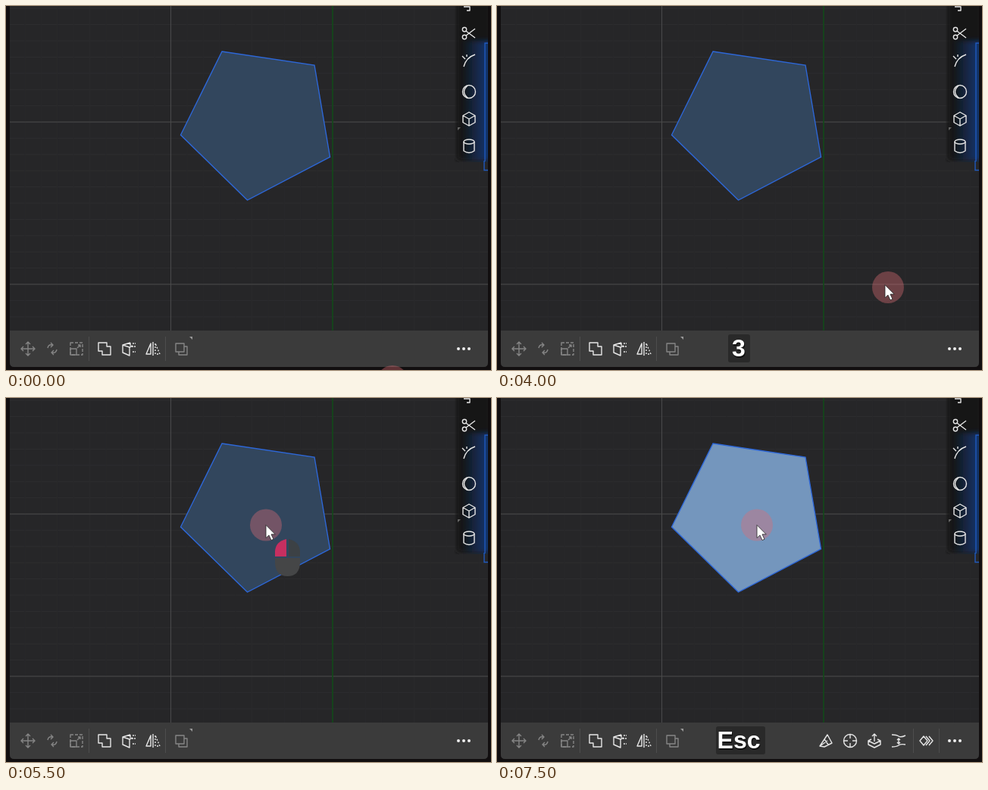
Animation, 640 px wide and 480 px high, one loop 8 s. Source, as an HTML page:

```html
<!DOCTYPE html>
<html lang="en">
<head>
<meta charset="utf-8">
<title>Extrude tool</title>
<style>
  html, body { margin: 0; width: 100%; height: 100%; overflow: hidden; background: #110e0f; }
  svg { display: block; width: 640px; height: 480px; }
  text { font-family: "Open Sans", "Noto Sans", sans-serif; font-size: 11.2px; fill: #c4c4c4; }
  .icon { fill: none; stroke: #e6e6e6; stroke-width: 1.4; stroke-linejoin: round; }
  .dim { stroke: #858585; }
  .bold { font-weight: 600; font-size: 11.7px; fill: #f2f2f2; }
  .soft { fill: #737373; }
  .white { fill: #f0f0f0; }
  .mid { text-anchor: middle; }
  .sep { stroke: #4d4d4d; }
  #hints text { font-size: 13px; fill: #a4a4a4; }
  #hints .end { text-anchor: end; }
  #hints .cap { font-size: 12px; font-weight: 600; text-anchor: middle; fill: #b5b5b5; }
  #key text { font: bold 32px "Liberation Sans", Arial, sans-serif; fill: #fff; text-anchor: middle; }
</style>
</head>
<body>
<svg id="scene" viewBox="0 0 640 480">
  <defs>
    <clipPath id="stage"><path d="M5 0H636V470Q636 476 630 476H11Q5 476 5 470Z"/></clipPath>
    <clipPath id="panelClip"><rect x="13" y="76" width="326" height="344" rx="4"/></clipPath>
    <clipPath id="sideClip"><rect x="592" width="44" height="206"/></clipPath>
    <linearGradient id="fade" gradientUnits="userSpaceOnUse" x1="235" x2="342" y1="0" y2="0">
      <stop stop-color="#4f7098" stop-opacity="0"/>
      <stop offset=".5" stop-color="#4f7098" stop-opacity=".25"/>
      <stop offset="1" stop-color="#5f82ab" stop-opacity=".6"/>
    </linearGradient>
    <linearGradient id="glow"><stop stop-color="#123b86" stop-opacity="0"/><stop offset="1" stop-color="#143f88"/></linearGradient>
    <filter id="blur" x="-30%" y="-30%" width="160%" height="160%"><feGaussianBlur stdDeviation="9"/></filter>
    <filter id="soften" x="-50%" y="-20%" width="200%" height="140%"><feGaussianBlur stdDeviation="3"/></filter>
  </defs>

  <rect width="640" height="480" fill="#110e0f"/>
  <g clip-path="url(#stage)">
    <rect width="640" height="480" fill="#262628"/>
    <g id="grid"></g>
    <path d="M217.500 0V428M5 153H636M5 367H636" stroke="#4a4a4b"/>
    <path d="M431 0V428" stroke="#124a19" stroke-width="1.6"/>
    <path id="shape" d="M285 60L407 78L427.500 199L318.500 256L230.500 170Z" stroke-width="1.4"/>
    <path id="through" d="M240 153H420" stroke="#7798a8"/>

    <g clip-path="url(#sideClip)">
      <rect x="594" y="-8" width="46" height="212" rx="5" fill="#151516" filter="url(#soften)"/>
      <rect x="602" y="46" width="44" height="158" fill="url(#glow)" filter="url(#soften)"/>
    </g>
    <path d="M637 49H632V205M631 204V216.500H637" fill="none" stroke="#2059bd" stroke-width="1.4"/>
    <path d="M596 160H600L596 164Z" fill="#666"/>
    <g class="icon">
      <path d="M604 1H612V6H608"/>
      <circle cx="605" cy="31" r="2.700"/><circle cx="605" cy="41" r="2.700"/><path d="M607 33L619 42M607 39L619 30"/>
      <path d="M604 80Q607 68 619 64M602 66L606 70M608 64V67"/>
      <circle cx="611" cy="113" r="8.500"/><path d="M609 105Q600 113 609 121"/>
      <path d="M611 140L619 144.500V153.500L611 158L603 153.500V144.500ZM603 144.500L611 149L619 144.500M611 149V158"/>
      <ellipse cx="611" cy="179" rx="7" ry="3"/><path d="M604 179V191Q611 196 618 191V179"/>
    </g>

    <rect x="5" y="428" width="631" height="48" fill="#3b3b3b"/>
    <path class="sep" d="M109.500 436V468M210.500 436V468"/>
    <g class="icon dim">
      <path d="M29 443V461M20 452H38M26 446L29 443L32 446M26 458L29 461L32 458M23 449L20 452L23 455M35 449L38 452L35 455"/>
      <path d="M55 451Q56 446 61 447M59 444L62 447L59 450M67 453Q66 458 61 457M63 454L60 457L63 460"/>
      <path d="M85 444H101V460H85Z" stroke-dasharray="4 2"/><path d="M85 452H93V460H85ZM94 451L98 447M95 447H98V450"/>
      <path d="M224 445H235V456H224ZM235 449H239V460H228V456"/>
    </g>
    <path d="M242 436H246V440Z" fill="#999"/>
    <g class="icon">
      <path d="M122 444H133V449H138V460H127V455H122Z"/>
      <path d="M164 444L154 447V457L163 461V450L154 447M163 450L167 448M164 444V448"/>
      <path d="M167 445H171M166 449H171M167 456H171" stroke-dasharray="2 1"/>
      <path d="M191 445V459H185ZM194 443V461"/><path d="M197 445V459H203Z" stroke-dasharray="2 2"/>
    </g>
    <g fill="#eee"><circle cx="597" cy="452" r="2"/><circle cx="604" cy="452" r="2"/><circle cx="611" cy="452" r="2"/></g>

    <g id="tools">
      <path class="sep" d="M549.500 436V468M583.500 436V468"/>
      <rect id="active" x="482" y="436" width="32" height="32" rx="4" fill="#9236e8"/>
      <g class="icon">
        <path d="M426 459L436 444L442 455L432 460ZM432 450L437 457M426 459L436 452"/>
        <circle cx="466" cy="452" r="8.500"/><path d="M466 444V449M466 455V460M458 452H463M469 452H474"/>
        <path d="M494 450L490 452V457L498 461L506 457V452L502 450M490 452L498 456L506 452M498 453V443M495 446L498 443L501 446"/>
        <path d="M521 444Q527 444 530 446T539 445M521 460Q527 460 530 458T539 457M530 449V456M528 451L530 449L532 451M528 454L530 456L532 454"/>
        <path d="M558 452L563 446L568 452L563 458ZM566 446L571 452L566 458M570 446L575 452L570 458"/>
      </g>
    </g>
    <g id="key"><rect y="433" height="37" rx="3" fill="#292929"/><text x="320" y="464" style="fill:#111"></text><text x="319" y="462"></text></g>
  </g>

  <g id="menu">
    <g id="hints">
      <text class="end" x="358" y="275">Slice</text><text class="end" x="362" y="331">Difference</text>
      <text class="end" x="380" y="359">Intersect</text><text class="end" x="358" y="387">Body</text><text class="end" x="359" y="415">Tools</text>
    </g>
    <rect x="13" y="76" width="326" height="344" rx="4" fill="#0e0e0f"/>
    <g clip-path="url(#panelClip)"><path d="M285 60L345 69V242L318 256L230 170Z" fill="url(#fade)" filter="url(#blur)"/></g>
    <path class="icon" d="M29 100L33 104L37 100"/>
    <text class="bold" x="45" y="107" style="font-size:13.400px">Extrude</text>
    <g fill="#a0a0a0" fill-opacity=".07" stroke="#fff" stroke-opacity=".08">
      <rect x="41.500" y="125" width="275" height="37" rx="18"/><rect x="41.500" y="169" width="275" height="37" rx="18"/>
    </g>
    <circle cx="60" cy="143.500" r="10" fill="#32a34a"/>
    <path class="icon" d="M55 144L58.500 147.500L65 140" stroke-width="2"/>
    <text class="bold" x="78" y="148">Select region, face, or curve</text><text class="soft" x="243" y="148">to extrude</text>
    <text class="bold" x="74" y="192">Select target bodies</text><text class="soft" x="194" y="192">to cut or join into</text>
    <path class="icon" d="M291.500 182.500L300.500 191.500M300.500 182.500L291.500 191.500"/>
    <path d="M26 218.500H316M26 372.500H327M254.500 385V404" stroke="#2a2a2b"/>
    <g id="fields"></g>
    <text x="29" y="356">Keep tools</text><text class="mid white" x="222" y="356">Keep Tools</text>
    <g fill="#2a2a2b"><rect x="159" y="384" width="40" height="21" rx="3"/><rect x="267" y="384" width="32" height="21" rx="3"/></g>
    <text class="mid bold" x="179" y="399">ESC</text><text class="white" x="203" y="399">Cancel</text>
    <path class="icon dim" d="M288 390V396H279M282 393L279 396L282 399"/><text class="white" x="303" y="399">OK</text>
  </g>

  <g id="mouse">
    <path d="M370 186V209H355V202Q356 189 370 186Z" fill="#c62f60"/>
    <path d="M373 186V209H388V202Q387 189 373 186Z" fill="#3c4145"/>
    <path d="M355 211H388V218Q387 235 371.500 235Q356 235 355 218Z" fill="#454647"/>
  </g>
  <circle id="halo" r="21" fill="#de6c74" fill-opacity=".38" stroke="#fff" stroke-width="2"/>
  <circle id="spot" cx="343" cy="167" r="7" fill="#efbd57"/>
  <path id="cursor" d="M0 0V17L4 13.400L7 20L10 18.700L7 12.300H12.200Z" fill="#fff" stroke="#222" stroke-width=".8"/>
</svg>
<script>
const $ = id => document.getElementById(id);
const add = (id, markup) => $(id).insertAdjacentHTML('beforeend', markup);
const show = (id, opacity) => $(id).style.opacity = +opacity;

const STEP = 21.4;
let lines = '';
for (let k = -7; k < 13; k++) lines += `M5 ${153 + k * STEP}H636`;
add('grid', `<path d="${lines}" stroke="#2d2d2f"/>`);
lines = '';
for (let k = -9; k < 20; k++) lines += `M${217.5 + k * STEP} 0V428`;
add('grid', `<path d="${lines}" stroke="#29292b"/>`);

[['Distance', '0.0 cm'], ['Degrees', '0'], ['Thickness', '0.0 cm']].forEach(([name, value], i) => {
  const y = 231 + 36 * i;
  add('fields', `<text x="29" y="${y + 17}">${name}</text>`);
  for (const x of [118, 227]) add('fields',
    `<rect x="${x}" y="${y}" width="101" height="24" rx="2" fill="#aaa" fill-opacity=".09"/>
     <text class="mid white" x="${x + 49.5}" y="${y + 17}">${value}</text>`);
});

[['F', 396, 260, 26, 'Freestyle'], ['V', 396, 288, 28, 'Pivot'], ['D', 497, 260, 28, 'Distance 1'],
 ['A', 497, 288, 28, 'Angle 1'], ['Shift+T', 497, 316, 60, 'Thickness']].forEach(([cap, x, y, w, label]) =>
  add('hints', `<rect x="${x}" y="${y}" width="${w}" height="21" rx="4" fill="#38383a"/>
    <text class="cap" x="${x + w / 2}" y="${y + 15}">${cap}</text><text x="${x + w + 4}" y="${y + 15}">${label}</text>`));

function ease(u) {
  u = Math.min(1, Math.max(0, u));
  return u * u * u * (u * (6 * u - 15) + 10);
}

function pointer(t) {
  const enter = ease((t - 1100) / 700);
  return {
    x: 510 + 6 * enter - 173 * ease((t - 3900) / 700),
    y: 495 - 124 * enter - 203.5 * ease((t - 3900) / 800)
  };
}

function isOver(shape, { x, y }) {
  const point = $('scene').createSVGPoint();
  point.x = x;
  point.y = y;
  return shape.isPointInFill(point);
}

function setKey(label, x, width) {
  for (const text of $('key').querySelectorAll('text')) text.textContent = label;
  const rect = $('key').querySelector('rect');
  rect.setAttribute('x', x);
  rect.setAttribute('width', width);
}

function draw(t) {
  const within = (a, b) => t >= a && t < b;
  const tip = pointer(t), trail = pointer(t - 100);
  const move = (id, p) => $(id).setAttribute('transform', `translate(${p.x} ${p.y})`);
  move('cursor', tip);
  move('halo', trail);

  const shape = $('shape');
  const hover = t < 5500 && isOver(shape, tip);
  const selected = t >= 5600;
  shape.setAttribute('fill', selected ? '#7496bd' : hover ? '#637b95' : '#32465d');
  shape.setAttribute('stroke', hover ? '#3f7fee' : '#2d67d8');
  show('through', hover);

  const extruding = within(5700, 7300);
  show('tools', selected);
  show('active', extruding);
  show('menu', extruding ? 1 : within(7300, 7400) ? 0.5 : 0);
  show('mouse', within(5300, 5700));
  show('spot', extruding);
  $('halo').setAttribute('stroke-opacity', extruding ? 1 : 0);

  show('key', within(3100, 4200) || t >= 7300);
  if (t < 7300) setKey('3', 305, 29); else setKey('Esc', 289, 65);
}

function frame(now) {
  draw(Math.floor(now % 8000 / 100) * 100);
  requestAnimationFrame(frame);
}
requestAnimationFrame(frame);
</script>
</body>
</html>
```
